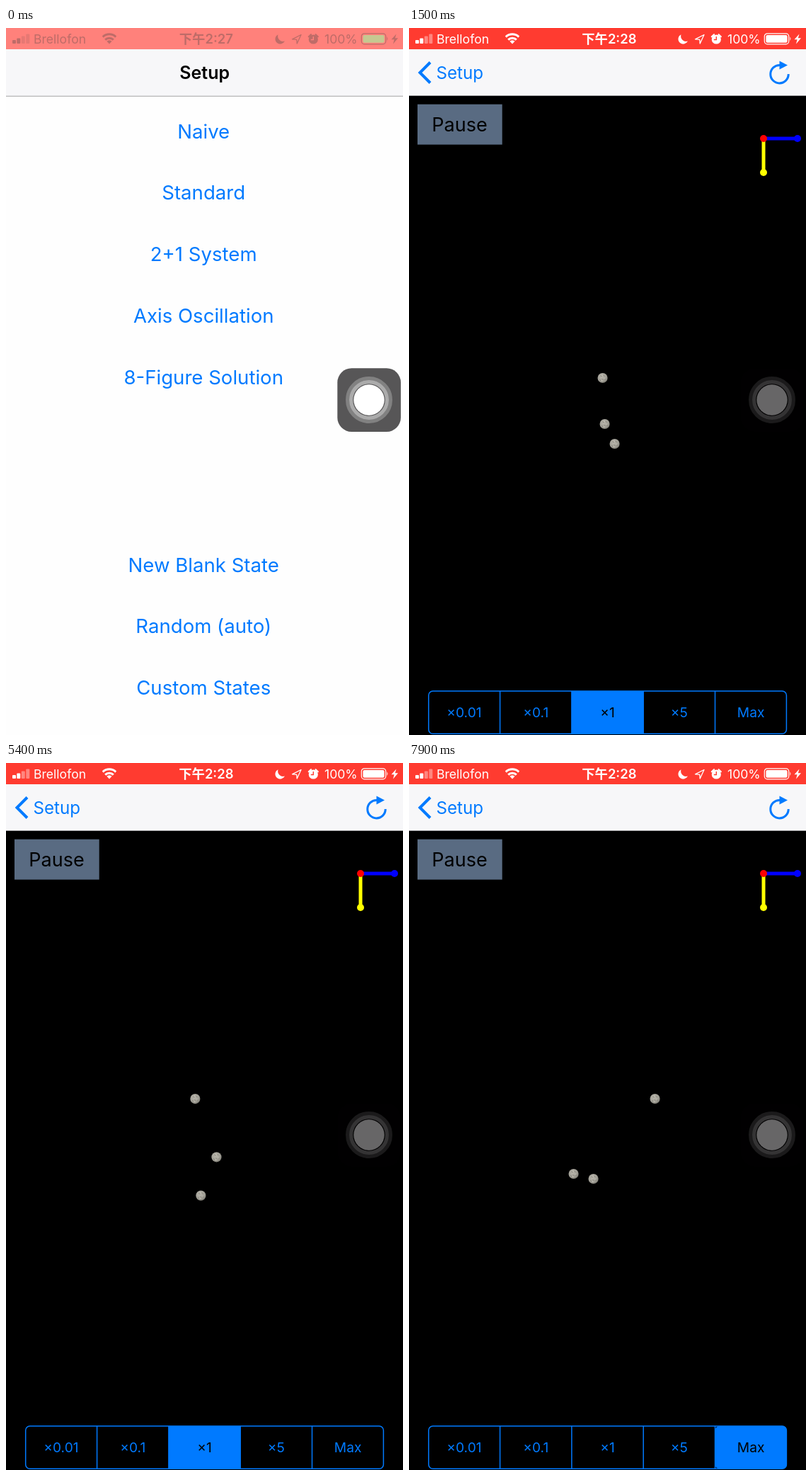
Animation of 561x998 px, one loop 8 s. Source, as an HTML page:

```html
<!DOCTYPE html>
<html lang="en">
<head>
<meta charset="utf-8">
<title>Three-body setup</title>
<style>
  html, body { margin: 0; width: 100%; height: 100%; overflow: hidden; background: #fefefe; }
  svg { display: block; width: 100vw; height: 100vh; }
  text { font-family: Inter, "Noto Sans CJK SC", "Noto Sans CJK TC", "Noto Sans CJK JP", "Noto Sans CJK", sans-serif; }
  .mid { text-anchor: middle; }
  .row { font-size: 27.6px; fill: #007aff; }
  .nav { font-size: 24.2px; }
  .seg { font-size: 19.2px; }
  .bar { font-size: 17.6px; }
</style>
</head>
<body>
<svg viewBox="0 0 561 998" preserveAspectRatio="none">
  <defs>
    <radialGradient id="rock" cx=".42" cy=".38" r=".65">
      <stop offset="0" stop-color="#bab7ad"/>
      <stop offset=".7" stop-color="#a09e95"/>
      <stop offset="1" stop-color="#77756d"/>
    </radialGradient>
    <g id="moon">
      <circle r="7.1" fill="url(#rock)"/>
      <path d="M-3-3l2 1M1-4l2 2M-1 1l2 2M-4 2l1 2M3 3l1-2" stroke="#86837a" stroke-width="1"/>
      <path d="M-1-5l1 2M2 0l1 1M-2 4l2 0" stroke="#c8c5ba" stroke-width="1"/>
    </g>
  </defs>

  <rect width="561" height="998" fill="#fefefe"/>
  <g id="menu"></g>

  <g id="scene">
    <rect y="95" width="561" height="903"/>
    <rect x="12" y="107.7" width="119.7" height="56.9" fill="#596b82"/>
    <text class="mid" x="71.5" y="146" font-size="27">Pause</text>
    <g stroke-width="5">
      <path d="M501 156H549" stroke="#00f"/>
      <path d="M501 156V204" stroke="#ff0"/>
    </g>
    <circle cx="549" cy="156" r="5" fill="#00f"/>
    <circle cx="501" cy="204" r="5" fill="#ff0"/>
    <circle cx="501" cy="156" r="5" fill="#f00"/>
    <g id="bodies"></g>
    <g id="segments"></g>
    <rect x="27.7" y="936" width="505.7" height="60.2" rx="6" fill="none" stroke="#007aff" stroke-width="1.5"/>
  </g>

  <rect y="30" width="561" height="65.7" fill="#f7f7f9"/>
  <rect y="95.7" width="561" height="1.2" fill-opacity=".3"/>
  <text id="title" class="mid" y="71.8" font-size="25" font-weight="600">Setup</text>
  <text id="back" class="nav" y="71.5" fill="#007aff">Setup</text>
  <g id="icons" fill="none" stroke="#007aff">
    <path d="M30 48.5L15.5 63L30 77.5" stroke-width="4"/>
    <path d="M524 52.5A12.7 12.7 0 1 0 536.2 65" stroke-width="3"/>
    <path d="M523.5 46.5V58.5L535 52.5Z" fill="#007aff" stroke="none"/>
  </g>

  <rect id="barBack" width="561" height="30"/>
  <g id="barInk">
    <rect x="9" y="17" width="5" height="5" rx="1"/>
    <rect x="15.3" y="14.5" width="5" height="7.5" rx="1"/>
    <g opacity=".38">
      <rect x="21.8" y="11.5" width="5" height="10.5" rx="1"/>
      <rect x="28.3" y="8.5" width="5" height="13.5" rx="1"/>
    </g>
    <text class="bar" x="39" y="22">Brellofon</text>
    <g fill="none" stroke="currentColor" stroke-width="3">
      <path d="M136.8 12.6A13.2 13.2 0 0 1 155.2 12.6"/>
      <path d="M140.2 16.6A8.2 8.2 0 0 1 151.8 16.6"/>
    </g>
    <path d="M142.4 18.8A5 5 0 0 1 149.6 18.8L146 22.5Z"/>
    <text id="clock" class="mid" x="282.8" y="22" font-size="18.4" font-weight="600"></text>
    <path d="M384.5 9.2A7 7 0 1 0 393.8 18.5A7.4 7.4 0 0 1 384.5 9.2Z"/>
    <path d="M417 9.5L404.5 15.8L410.7 16.3L411.2 22Z" fill="none" stroke="currentColor" stroke-width="1.3" stroke-linejoin="round"/>
    <circle cx="434.3" cy="16" r="6.6"/>
    <path d="M427.8 12.3L431 9.2M440.8 12.3L437.6 9.2" stroke="currentColor" stroke-width="2.2" stroke-linecap="round"/>
    <path id="hands" d="M434.3 12V16.5H430.8" fill="none" stroke-width="1.4"/>
    <text class="bar" x="450" y="22">100%</text>
    <rect x="502.3" y="7.8" width="34.4" height="15" rx="4" fill="none" stroke="currentColor" stroke-width="1.2"/>
    <rect id="charge" x="504.4" y="9.9" width="30.2" height="10.8" rx="2"/>
    <path d="M538.4 12.6Q540.4 15.3 538.4 18Z"/>
    <path d="M551.5 8.5L544.5 16.3H548.6L547 22.5L554 14.2H549.8Z"/>
  </g>

  <g id="assist" stroke="#fff" fill="none">
    <g><rect x="468.3" y="480.3" width="89.6" height="89.6" rx="20" fill="#050305" fill-opacity=".667" stroke="none"/></g>
    <g><circle cx="513" cy="525" r="30.5" stroke-width="5" stroke-opacity=".25"/></g>
    <g><circle cx="513" cy="525" r="25.4" stroke-width="5.2" stroke-opacity=".5"/></g>
    <g><circle cx="513" cy="525" r="21.7" fill="#fff" stroke="none"/></g>
  </g>
</svg>
<script>
const LOOP = 8000, STEP = 100;
const CENTER = [280.6, 547];
const $ = id => document.getElementById(id);
const clamp = x => Math.max(0, Math.min(1, x));
const ramp = (t, from, to) => clamp((t - from) / (to - from));
const mix = (a, b, k) => a + (b - a) * k;
const color = (a, b, k) => `rgb(${a.map((v, i) => Math.round(mix(v, b[i], k)))})`;
const shift = (x, y = 0) => `translate(${x.toFixed(2)} ${y.toFixed(2)})`;

function add(parent, name, attrs, text = "") {
  const node = document.createElementNS("http://www.w3.org/2000/svg", name);
  for (const key in attrs) node.setAttribute(key, attrs[key]);
  node.textContent = text;
  return parent.appendChild(node);
}

const rows = ["Naive", "Standard", "2+1 System", "Axis Oscillation", "8-Figure Solution",
  "New Blank State", "Random (auto)", "Custom States"].map((label, i) =>
  add($("menu"), "text", {
    class: "row mid", x: 279.2, y: i < 5 ? 155.5 + i * 86.8 : 767.5 + (i - 5) * 86.8
  }, label));

const SEGMENT_WIDTH = 101.3;
const segments = ["×0.01", "×0.1", "×1", "×5", "Max"].map((label, i) => {
  const x = 27.3 + i * SEGMENT_WIDTH;
  const box = add($("segments"), "rect", {
    x, y: 936, width: SEGMENT_WIDTH, height: 60.2, rx: i % 4 ? 0 : 6, stroke: "none"
  });
  if (i) add($("segments"), "path", { d: `M${x} 936V996`, stroke: "#007aff", "stroke-width": 1.5 });
  const text = add($("segments"), "text", { class: "seg mid", x: x + SEGMENT_WIDTH / 2, y: 972.7 }, label);
  return { box, text };
});

// Waypoints around the centre of mass: time, then x and y of each body.
const PATH = [
  [1100, -2, -58, -2, 20, 4, 38],
  [1500, -7, -53, -4, 12, 10, 40],
  [3100, -39, -31, 3, -20, 35, 51],
  [4600, -41, -60, 1, 37, 37, 23],
  [6200, 20, -81, -12, 78, -8, 3],
  [7900, 67, -73, -20, 40, -48, 33]
];
const bodies = [0, 1, 2].map(() => add($("bodies"), "use", { href: "#moon" }));

function slope(i, c) {
  const a = PATH[Math.max(0, i - 1)], b = PATH[Math.min(PATH.length - 1, i + 1)];
  return (b[c] - a[c]) / (b[0] - a[0]);
}

function along(t, c) {
  t = Math.max(PATH[0][0], Math.min(t, PATH[PATH.length - 1][0]));
  let i = 0;
  while (i < PATH.length - 2 && t > PATH[i + 1][0]) i++;
  const a = PATH[i], b = PATH[i + 1], span = b[0] - a[0], u = (t - a[0]) / span;
  const v = 1 - u;
  return v * v * (1 + 2 * u) * a[c] + u * u * (3 - 2 * u) * b[c]
    + span * u * v * (v * slope(i, c) - u * slope(i + 1, c));
}

function drawStatus(t) {
  const k = ramp(t, 0, 300);
  const back = color([255, 129, 123], [255, 59, 48], k);
  const ink = color([190, 108, 104], [255, 255, 255], k);
  $("barBack").setAttribute("fill", back);
  $("barInk").setAttribute("fill", ink);
  $("barInk").setAttribute("color", ink);
  $("hands").setAttribute("stroke", back);
  $("charge").setAttribute("fill", color([198, 200, 145], [255, 255, 255], k));
  $("clock").textContent = t < 200 ? "下午2:27" : "下午2:28";
}

function drawPush(t) {
  const p = 1 - (1 - ramp(t, 950, 1400)) ** 3;
  $("menu").setAttribute("transform", shift(-168 * p));
  $("scene").setAttribute("transform", shift(561 * (1 - p)));
  $("title").setAttribute("x", mix(280.7, 72, p));
  $("title").setAttribute("opacity", 1 - p);
  $("back").setAttribute("x", mix(247, 38.5, p));
  $("back").setAttribute("opacity", p);
  $("icons").setAttribute("opacity", p);
  rows[6].setAttribute("opacity", t < 800 ? 1 : mix(0.2, 1, ramp(t, 950, 1250)));
}

function drawSegments(t) {
  const k = ramp(t, 6100, 6300);
  segments.forEach(({ box, text }, i) => {
    const on = i === 2 ? 1 - k : i === 4 ? k : 0;
    box.setAttribute("fill", color([0, 0, 0], [0, 122, 255], on));
    text.setAttribute("fill", color([0, 122, 255], [0, 0, 0], on));
  });
}

// Each layer fades on its own, so the backdrop shows through all of them.
function drawAssist(t) {
  const opacity = mix(1, 0.4, ramp(t, 200, 600));
  for (const layer of $("assist").children) layer.setAttribute("opacity", opacity);
}

function draw(t) {
  drawStatus(t);
  drawPush(t);
  drawSegments(t);
  drawAssist(t);
  bodies.forEach((body, i) => body.setAttribute("transform",
    shift(CENTER[0] + along(t, 1 + 2 * i), CENTER[1] + along(t, 2 + 2 * i))));
}

const start = performance.now();
function tick() {
  const t = (performance.now() - start) % LOOP;
  draw(Math.floor(t / STEP) * STEP);
  requestAnimationFrame(tick);
}
tick();
</script>
</body>
</html>
```
